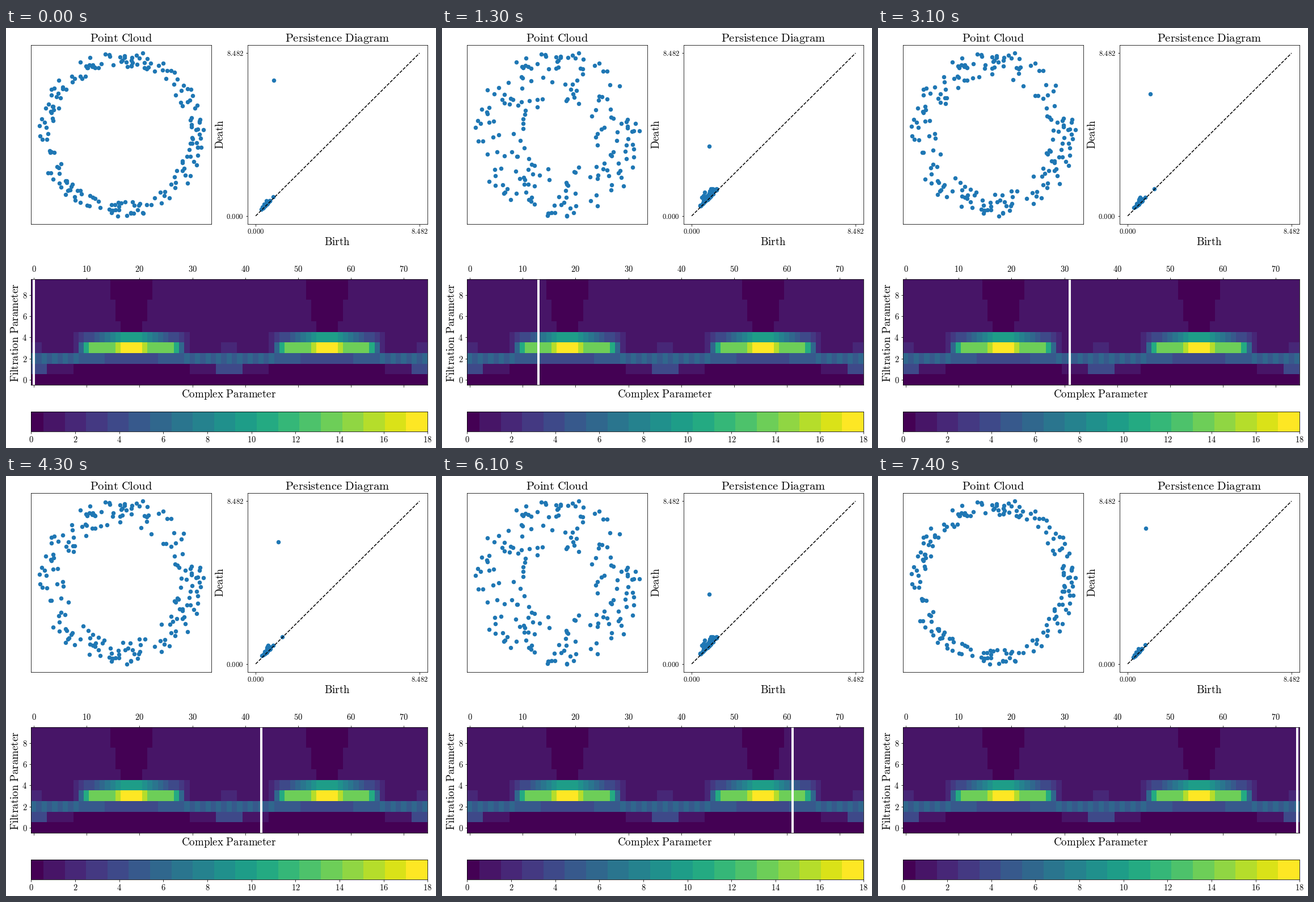
Write a matplotlib script that moves like this. It is 758x739 px and loops after 7500 ms.

```python
import numpy as np
import matplotlib.pyplot as plt
from matplotlib.animation import FuncAnimation

W, H, PX = 758, 739, 0.72          # stage size, points per pixel
FRAMES, PERIOD, N = 75, 37, 200
HALF = PERIOD // 2
TOP, OUTER = 8.482, 5.0
LEFT, RIGHT = 44.42, 743.42
BLUE = "#1f77b4"

plt.rcParams.update({
    "mathtext.fontset": "cm",
    "axes.linewidth": 0.8 * PX,
    "xtick.major.width": 0.8 * PX, "ytick.major.width": 0.8 * PX,
    "xtick.major.size": 3.5 * PX, "ytick.major.size": 3.5 * PX,
    "xtick.major.pad": 3.5 * PX, "ytick.major.pad": 3.5 * PX,
})
fig = plt.figure(figsize=(7.58, 7.39), dpi=100, facecolor="white")


def rm(text):
    return r"$\mathrm{" + str(text).replace(" ", r"\ ") + "}$"


def axes(left, top, right, bottom):
    return fig.add_axes([left / W, 1 - bottom / H, (right - left) / W, (bottom - top) / H])


def label(x, y, text, size, angle=0):
    fig.text(x / W, 1 - y / H, rm(text), fontsize=size * PX, rotation=angle,
             rotation_mode="anchor", ha="center", va="baseline")


def ticks(axis, values, size, fmt="{}"):
    axis.set_ticks(values, [rm(fmt.format(v)) for v in values], fontsize=size * PX)


def dots(ax):
    return ax.scatter([], [], s=(6 * PX) ** 2, lw=1.5 * PX, color=BLUE)


def padded(v):
    pad = 0.05 * np.ptp(v)
    return v.min() - pad, v.max() + pad


def fold(k):
    """Distance from the nearest end of the cycle."""
    m = k % PERIOD
    return min(m, PERIOD - m)


def sigmoid(x):
    return 1 / (1 + np.exp(-x))


# Rejection sampling from one fixed stream, so points outside the hole persist.
stream = np.random.RandomState(48824).uniform(-OUTER, OUTER, (2400, 2))
radii = np.hypot(*stream.T)


def cloud(j):
    inner = 2.75 + 1.25 * np.cos(2 * np.pi * j / PERIOD)
    return stream[(radii >= inner) & (radii <= OUTER)][:N]


def diagram(j):
    rng = np.random.default_rng(100 + j)
    w = (1 - np.cos(2 * np.pi * j / PERIOD)) / 2
    n = int(32 + 50 * w)
    cap = 0.78 + 0.78 * w
    birth = rng.normal(0.52 + 0.38 * w, 0.12 + 0.08 * w, n)
    birth = np.clip(birth, 0.28 + 0.2 * w, cap - 0.05)
    death = np.minimum(birth + 0.03 + rng.exponential(0.05 + 0.09 * w, n), cap)
    keys = [0, 6, 13, HALF]
    hole = (np.interp(j, keys, [0.94, 1.16, 0.90, 1.0]),
            np.interp(j, keys, [7.06, 6.35, 3.62, 1.7]))
    late = (np.interp(j, keys, [0.91, 1.39, 1.30, 1.5]),
            np.interp(j, keys, [1.00, 1.41, 1.40, 1.6]))
    return np.vstack([np.c_[birth, death], hole, late])


def betti():
    """Loop counts: a growing crowd of small loops, then one large hole."""
    j = np.array([fold(k) for k in range(FRAMES)])
    rows = np.ones((10, FRAMES))
    rows[0] = 0
    rows[1] = np.where(j < 3, 4, j < 8)
    rows[2] = 5.5 + 0.5 * np.cos(np.pi * j) * (j < 10) - np.clip((j - 9) / 5, 0, 1.75)
    rows[3] = 1 + (j < 2) + 13 * sigmoid((j - 9.3) / 0.5) + 4 * sigmoid((j - 16) / 0.4)
    rows[4] = 1 + 0.85 * np.clip(j - 7, 0, 10.5)
    for level in range(5, 10):
        rows[level] = j < 17 - (level - 4) // 2
    return np.round(rows)


# Point cloud
ax_cloud = axes(LEFT, 29.9, 362.15, 345)
ax_cloud.set(xticks=[], yticks=[])
points = dots(ax_cloud)

# Persistence diagram
ax_dgm = axes(425.7, 29.9, RIGHT, 345)
span = padded(np.array([0, TOP]))
ax_dgm.set(xlim=span, ylim=span)
for axis in (ax_dgm.xaxis, ax_dgm.yaxis):
    ticks(axis, [0, TOP], 12.6, "{:.3f}")
ax_dgm.plot([0, TOP], [0, TOP], "k--", lw=1.5 * PX)
pairs = dots(ax_dgm)

# Betti numbers over both parameters
ax_map = axes(LEFT, 441.8, RIGHT, 628.2)
scale = dict(cmap="viridis", vmin=0, vmax=18, aspect="auto", interpolation="nearest")
ax_map.imshow(betti(), origin="lower", **scale)
ticks(ax_map.xaxis, range(0, 71, 10), 14.5)
ticks(ax_map.yaxis, range(0, 9, 2), 14.5)
ax_map.tick_params(axis="x", top=True, labeltop=True, labelbottom=False, pad=6 * PX)
cursor = ax_map.axvline(0, color="white", lw=4 * PX)

# Colour scale in steps
ax_bar = axes(LEFT, 675, RIGHT, 710)
ax_bar.imshow(np.arange(19)[None], extent=(-0.4, 18, 0, 1), **scale)
ax_bar.set(xlim=(0, 18), yticks=[])
ticks(ax_bar.xaxis, range(0, 19, 2), 14.5)

label(203.3, 23.5, "Point Cloud", 20.5)
label(584, 23.5, "Persistence Diagram", 20.5)
label(584, 381.5, "Birth", 19)
label(383.5, 187.5, "Death", 19, 90)
label(393, 650, "Complex Parameter", 19)
label(22, 536, "Filtration Parameter", 19, 90)

states = [(cloud(j), diagram(j)) for j in range(HALF + 1)]


def update(k):
    xy, dgm = states[fold(k)]
    points.set_offsets(xy)
    ax_cloud.set(xlim=padded(xy[:, 0]), ylim=padded(xy[:, 1]))
    pairs.set_offsets(dgm)
    cursor.set_xdata([k, k])
    return points, pairs, cursor


anim = FuncAnimation(fig, update, frames=FRAMES, interval=100, repeat=True, repeat_delay=0)
plt.show()
```
